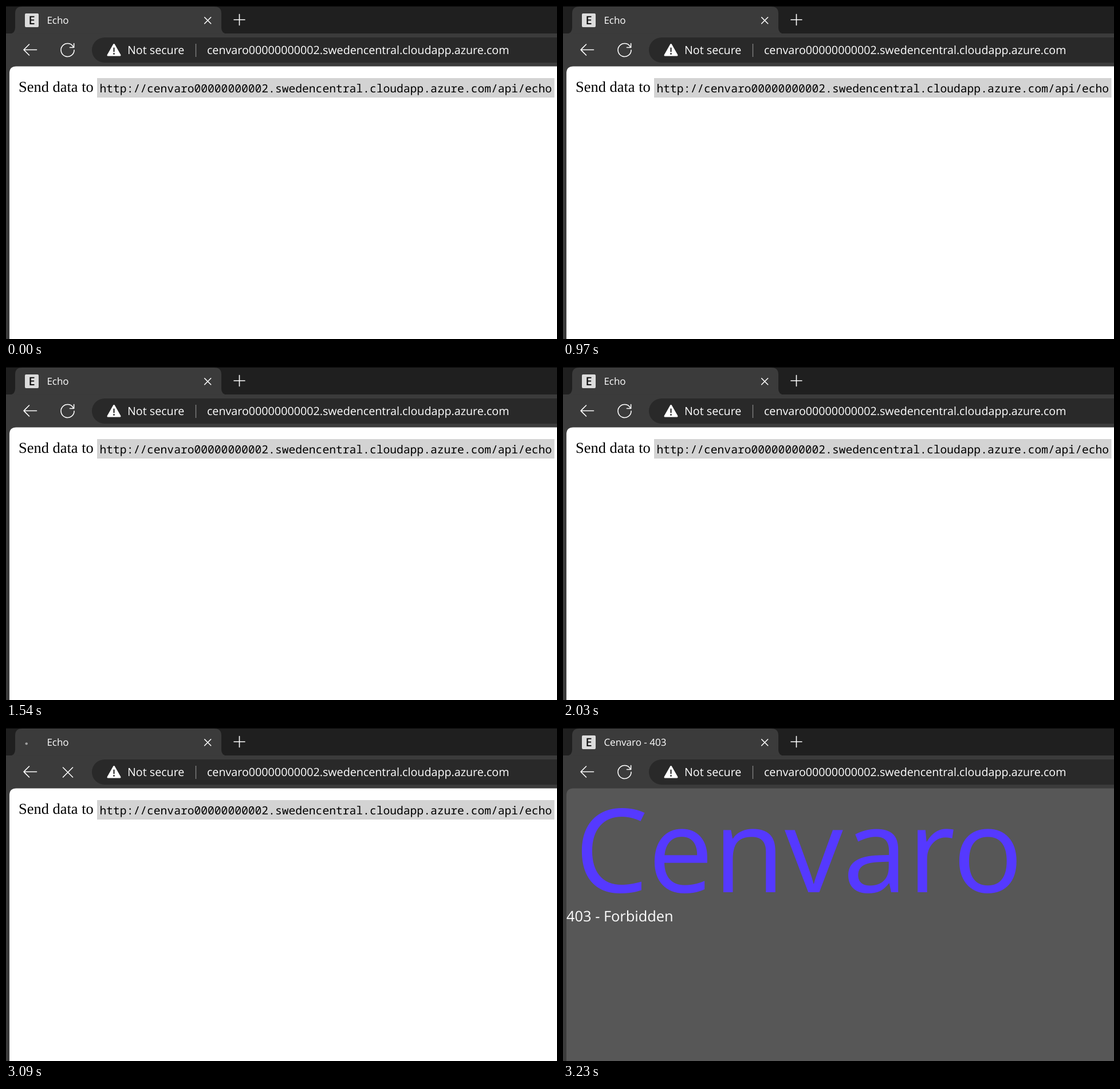
Animation, 962 px wide and 582 px high, one loop 5230 ms. Source, as an HTML page:

```html
<!DOCTYPE html>
<html lang="en">
<head>
<meta charset="utf-8">
<title>Blocked request</title>
<style>
  html, body { margin: 0; width: 100%; height: 100%; overflow: hidden; background: #3b3b3b; }
  svg { display: block; width: 962px; height: 582px; }
  text { font-family: "Open Sans", "Noto Sans", sans-serif; text-rendering: geometricPrecision; white-space: pre; }
  .serif { font-family: "Liberation Serif", serif; font-size: 26.45px; }
  .mono { font-family: "Noto Sans Mono", monospace; font-size: 19.65px; }
  .bar { font-size: 19.7px; fill: #fff; }
  .line { fill: none; stroke: #fff; stroke-width: 1.6; stroke-linecap: round; stroke-linejoin: round; }
</style>
</head>
<body>
<svg viewBox="0 0 962 582">
  <!-- window and tab strip -->
  <rect width="962" height="582" fill="#3b3b3b"/>
  <rect width="962" height="48" fill="#1f1f1f"/>
  <rect width="962" height="1" fill="#080808"/>
  <path fill="#3b3b3b" d="M6 48.500Q16 48 16 38V13Q16 1 28 1H364Q376 1 376 13V38Q376 48 386 48.500Z"/>
  <text id="title" x="71.400" y="31" font-size="17" fill="#fff"></text>
  <path class="line" d="M346.700 19.800l11 11m0-11l-11 11"/>
  <path class="line" d="M398 24h19M407.500 14.500v19"/>

  <g id="favicon">
    <rect x="33" y="13" width="24" height="24" rx="2" fill="#dcdcdc"/>
    <text x="45" y="32" font-size="20" font-weight="600" text-anchor="middle" fill="#111">E</text>
  </g>
  <circle id="spinner" r="2.200"/>

  <!-- toolbar -->
  <path class="line" d="M53.500 76.500H31M40.500 67L31 76.500L40.500 86"/>
  <path id="reload" class="line" d="M119 77A11.500 11.500 0 1 1 117.500 71.300M118.600 65.500V72.500H111.500"/>
  <path id="stop" class="line" d="M99.500 69l17 17m0-17l-17 17"/>
  <path fill="#292929" d="M962 55H172a22 22 0 0 0 0 44H962Z"/>
  <path fill="#fff" stroke="#fff" stroke-width="3" stroke-linejoin="round" d="M188.500 67.500L199 86H178Z"/>
  <path stroke="#292929" stroke-width="2.200" stroke-linecap="round" d="M188.500 73.500v6"/>
  <circle cx="188.500" cy="83.500" r="1.400" fill="#292929"/>
  <text class="bar" x="212" y="84">Not secure</text>
  <path stroke="#858585" stroke-width="1.300" d="M331.500 66v23"/>
  <text class="bar" x="351" y="84">cenvaro00000000002.swedencentral.cloudapp.azure.com</text>

  <!-- page -->
  <path id="page" d="M962 105.500H18Q6 105.500 6 117.500V582H962Z"/>
  <g id="echo">
    <text class="serif" x="22" y="150">Send data to</text>
    <rect x="159" y="126" width="798.500" height="34" fill="#d3d3d3"/>
    <text class="mono" x="163.500" y="150.500">http://cenvaro00000000002.swedencentral.cloudapp.azure.com/api/echo</text>
  </g>
  <g id="denied">
    <text x="20.500" y="287" font-size="203" fill="#5539ff">Cenvaro</text>
    <text x="6" y="338" font-size="25.400" fill="#fff">403 - Forbidden</text>
  </g>
</svg>
<script>
  const LOOP = 5230;
  const RECEIVE = 60; // the response arrives this long before a load ends
  const LOADS = [[100, 300], [670, 970], [1250, 1540], [1800, 2030], [2370, 2590], [2960, 3230]];
  const [, LAST_END] = LOADS[LOADS.length - 1];

  const el = id => document.getElementById(id);
  const show = (id, visible) => el(id).style.display = visible ? "" : "none";

  function placeSpinner(elapsed, receiving) {
    const angle = (9 + 0.05 * elapsed) * Math.PI / 180;
    const spinner = el("spinner");
    spinner.setAttribute("cx", 45.2 - 9.8 * Math.cos(angle));
    spinner.setAttribute("cy", 24.7 + 9.8 * Math.sin(angle));
    spinner.setAttribute("fill", receiving ? "#5faae8" : "#a0a0a0");
  }

  function render(t) {
    const load = LOADS.find(([start, end]) => t >= start && t < end);
    const denied = t >= LAST_END - RECEIVE;

    show("favicon", !load);
    show("reload", !load);
    show("spinner", load);
    show("stop", load);
    if (load) placeSpinner(t - load[0], t >= load[1] - RECEIVE);

    show("echo", !denied);
    show("denied", denied);
    el("page").setAttribute("fill", denied ? "#575757" : "#fff");
    el("title").textContent = t >= LAST_END ? "Cenvaro - 403" : "Echo";
  }

  const begin = performance.now();
  function tick() {
    render((performance.now() - begin) % LOOP);
    requestAnimationFrame(tick);
  }
  tick();
</script>
</body>
</html>
```
